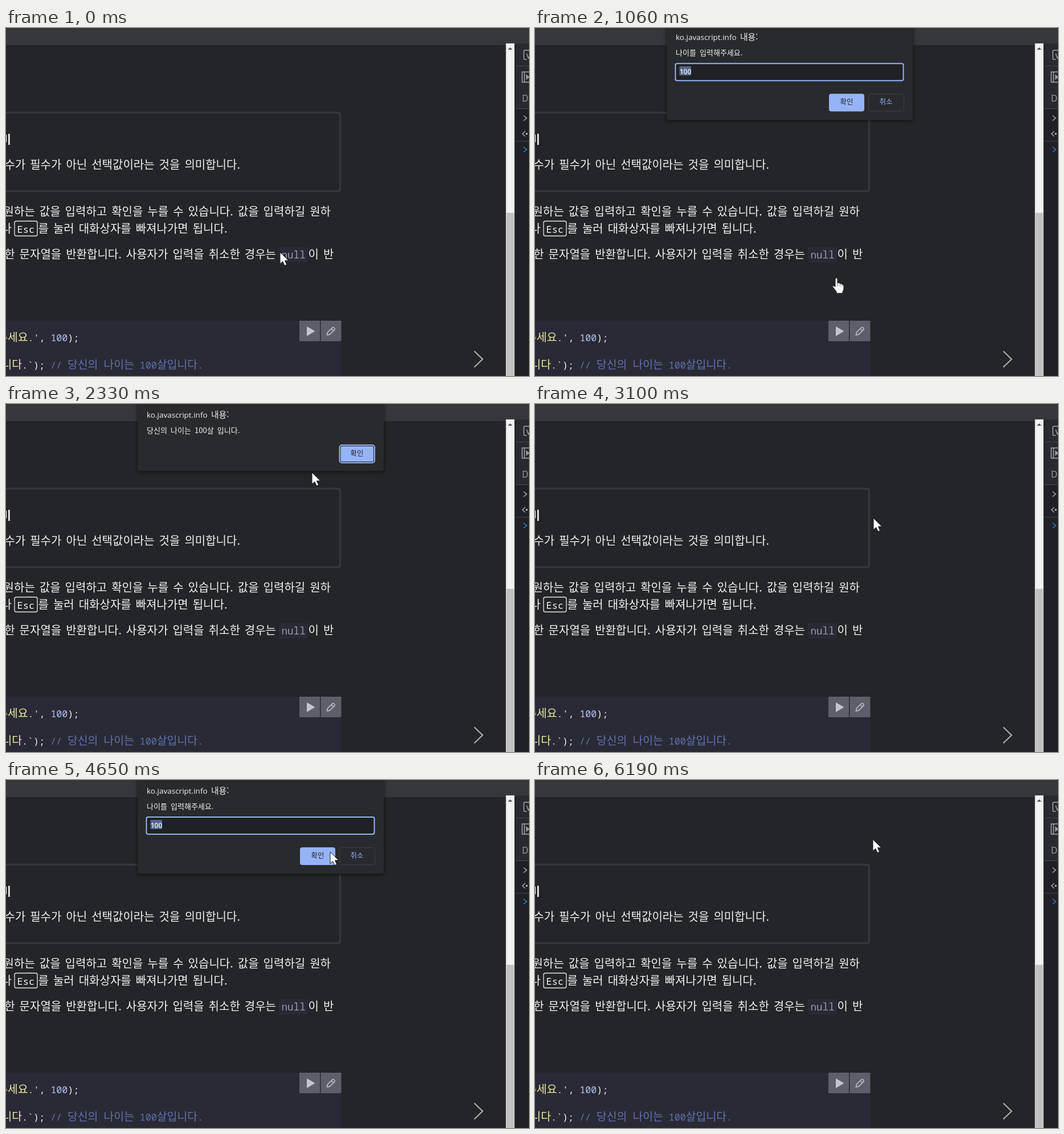
Recreate the animation shown at these times as an HTML page. Size 918 by 610 pixels, loop 6270 ms.

```html
<!DOCTYPE html>
<html lang="ko">
<head>
<meta charset="utf-8">
<style>
  html, body { margin: 0; width: 100%; height: 100%; overflow: hidden; background: #242528; }
  svg { display: block; }
  text { white-space: pre; font: 20px "Noto Sans CJK KR", "Noto Sans CJK", sans-serif; fill: #f2f2f2; }
  .body { word-spacing: 2.4px; }
  .end { text-anchor: end; }
  .mono { font: 16.6px "Noto Sans Mono", "DejaVu Sans Mono", monospace; }
  .medium { font-weight: 500; }
  .ko { font: 19.4px "Noto Sans CJK KR", "Noto Sans CJK", sans-serif; }
  .str { fill: #f0e9a0; }
  .num { fill: #b9c3fa; }
  .note { fill: #6171ae; }
  .ui { font: 13.5px "Open Sans", sans-serif; }
  .msg { font-size: 13px; word-spacing: 2.5px; }
  .btn { font-size: 12.4px; text-anchor: middle; }
  .line { fill: none; stroke: #a4a7ab; stroke-width: 1.5; }
  .panel { fill: #292a2d; filter: drop-shadow(0 1px 3px #0009); }
</style>
</head>
<body>
<svg width="918" height="610" viewBox="0 0 918 610">
  <defs>
    <g id="heading">
      <text class="ui" x="247" y="24">ko.javascript.info</text>
      <text x="360" y="24" style="font-size:14.8px">내용:</text>
    </g>
  </defs>

  <!-- page -->
  <rect width="918" height="30" fill="#36373a"/>
  <rect x="-10" y="148.5" width="596.5" height="137.5" rx="4" fill="none" stroke="#36373b" stroke-width="3.5"/>
  <text class="end" x="9" y="203" style="font-weight:700">의미</text>
  <text class="body end" x="411" y="247">수가 필수가 아닌 선택값이라는 것을 의미합니다.</text>
  <text class="body end" x="570" y="329">원하는 값을 입력하고 확인을 누를 수 있습니다. 값을 입력하길 원하</text>
  <text class="end" x="10" y="359">나</text>
  <rect x="15" y="338.5" width="40" height="26" rx="3" fill="none" stroke="#e8e8e8" stroke-width="1.3"/>
  <text class="mono medium" x="19.5" y="358.5" style="font-size:17px">Esc</text>
  <text class="body" x="56.5" y="359">를 눌러 대화상자를 빠져나가면 됩니다.</text>
  <text class="body end" x="474" y="404">한 문자열을 반환합니다. 사용자가 입력을 취소한 경우는</text>
  <rect x="479" y="384" width="51" height="27" rx="3" fill="#2a2a36"/>
  <text class="mono" x="483.5" y="403.5" style="font-size:17.6px;fill:#9797a6">null</text>
  <text class="body" x="530.5" y="404">이 반</text>

  <!-- code block -->
  <rect y="513" width="588" height="97" fill="#2a2a36"/>
  <text class="mono medium" x="-15" y="548.5"><tspan class="ko str">주세요</tspan><tspan class="str">.'</tspan>, <tspan class="num">100</tspan>);</text>
  <text class="mono medium" x="-25.5" y="597"><tspan class="ko str">입니다</tspan><tspan class="str">.`</tspan>);</text>
  <text class="mono note" x="78" y="597">// <tspan class="ko">당신의</tspan> <tspan class="ko">나이는</tspan> 100<tspan class="ko">살입니다</tspan>.</text>
  <path d="M515 513h36v36h-36zM552.500 513h36v36h-36z" fill="#5d5f69"/>
  <path id="play" d="M528 523L542.500 531.500L528 540Z"/>
  <path d="M563.500 538l1-4.500 8.500-8.500q1.500-1 2.700.3l1 1q1 1.200 0 2.500l-8.700 8.500zM571 527l3.700 3.700" fill="none" stroke="#c5c6cb" stroke-width="1.500"/>
  <path d="M822 566.500L836.500 580.500L822 594.500" fill="none" stroke="#acadae" stroke-width="2.200"/>

  <!-- scrollbar and side panel -->
  <rect x="893" y="27" width="25" height="583" fill="#202124"/>
  <rect x="895" y="27" width="23" height="114" fill="#292a2d"/>
  <rect x="877.500" y="27" width="15" height="583" fill="#f1f1f1"/>
  <rect x="878.500" y="324" width="13" height="286" fill="#c1c1c1"/>
  <path d="M881 38l4-4 4 4z" fill="#505050"/>
  <path d="M895 66.500h23M895 141.500h23M895 198.500h23" stroke="#45474b"/>
  <path class="line" d="M918 39h-7q-2 0-2 2v12q0 2 2 2h3M914 45l3 8 3-5M920 77h-14v18h14M910 77v18"/>
  <path d="M913 81l6 5-6 5z" fill="#9a9da1"/>
  <text class="ui" x="905.500" y="129" style="font-size:16px;fill:#9a9da1">D</text>
  <path class="line" d="M908.500 153.500l5.500 4.500-5.500 4.500M911.500 181l-5 4.500 5 4.500"/>
  <circle cx="914" cy="185.500" r="1.700" fill="#b5b7ba"/>
  <path class="line" d="M908.500 208.500l5.500 4.500-5.500 4.500" style="stroke:#3b78d8"/>

  <!-- dialogs -->
  <g id="prompt">
    <rect class="panel" x="231" y="-30" width="432" height="194" rx="4"/>
    <use href="#heading"/>
    <text class="msg" x="247" y="51">나이를 입력해주세요.</text>
    <rect x="246.500" y="65" width="400" height="30" rx="3" fill="#202124" stroke="#96b3f8" stroke-width="2"/>
    <rect x="253.500" y="70" width="20.500" height="16" fill="#56668c"/>
    <text class="ui" x="253.700" y="83.500" style="font-size:12px;font-weight:600">100</text>
    <rect x="516" y="118" width="62" height="31" rx="4" fill="#96b3f8"/>
    <text class="btn" x="547" y="137" style="fill:#202124">확인</text>
    <rect x="585.500" y="118.500" width="62" height="30" rx="4" fill="none" stroke="#3c4043"/>
    <text class="btn" x="616" y="137" style="fill:#96b3f8">취소</text>
  </g>
  <g id="alert">
    <rect class="panel" x="231" y="-30" width="432" height="147.500" rx="4"/>
    <use href="#heading"/>
    <text class="msg" id="message" x="247" y="51"></text>
    <rect x="585.500" y="72" width="61.500" height="31" rx="4" fill="#202124" stroke="#96b3f8" stroke-width="2"/>
    <rect x="587.500" y="74" width="57.500" height="27" rx="2.500" fill="#96b3f8"/>
    <text class="btn" x="616" y="91" style="fill:#202124">확인</text>
  </g>

  <g id="cursor" fill="#fff" stroke="#17181a" stroke-linejoin="round">
    <path id="arrow" d="M0 0V20.500L4.700 16.300L8 23.500L11.700 22L8.500 14.800H15Z"/>
    <g id="hand">
      <path d="M-2 2Q-2 0 0 0T2 2V9Q5 8 6.500 10Q9 9.500 10 11.500Q13 11 13 14V19Q13 22 11 24V27H0V24L-6 16.500Q-7 14 -5 13.500L-2 15.500Z"/>
      <path d="M2.500 10v5M6.500 11v4M10 12v3" fill="none" stroke="#777"/>
    </g>
  </g>
</svg>
<script>
const LOOP = 6270, STEP = 77.5, FADE = 110;
const el = id => document.getElementById(id);
const clamp = v => Math.max(0, Math.min(1, v));
const show = (id, on) => el(id).setAttribute('visibility', on ? 'visible' : 'hidden');

// Pointer moves from stop to stop; bend bows the path sideways at its middle
const moves = [
  { start: 130, end: 680, to: [531, 524], bend: [22, 0] },
  { start: 910, end: 1530, to: [520, 137] },
  { start: 1610, end: 2080, to: [527, 88] },
  { start: 2330, end: 2950, to: [615, 90], bend: [0, 80] },
  { start: 3020, end: 3560, to: [531, 530] },
  { start: 3730, end: 4030, to: [400, 84], bend: [-44, -44] },
  { start: 4180, end: 4800, to: [617, 138] },
  { start: 4880, end: 5500, to: [614, 92], bend: [-41, 48] },
  { start: 5580, end: 6190, to: [590, 105] },
];

const dialogs = [
  { id: 'prompt', open: 900, close: 1760, bottom: 164 },
  { id: 'alert', open: 1900, close: 2900, bottom: 117, value: '100' },
  { id: 'prompt', open: 3720, close: 4870, bottom: 164 },
  { id: 'alert', open: 5010, close: 5640, bottom: 117, value: 'null' },
];

// The screen refreshes every STEP ms during a move and rests in between
function stateAt(t) {
  let time = 0, point = [481, 393];
  for (const { start, end, to, bend = [0, 0] } of moves) {
    if (t < start) break;
    const last = Math.round((end - start) / STEP);
    const step = Math.min(last, Math.floor((t - start) / STEP + 0.05));
    const p = (step + 1) / (last + 1);
    time = start + step * STEP;
    point = point.map((v, i) => v + (to[i] - v) * p + 4 * p * (1 - p) * bend[i]);
  }
  return { time, point };
}

function drawDialog(dialog, t) {
  const enter = clamp((t - dialog.open) / 200);
  const leave = clamp((t - dialog.close) / FADE);
  const group = el(dialog.id);
  group.setAttribute('opacity', Math.min(1, enter * 3) * (1 - leave));
  group.setAttribute('transform', `translate(0 ${-16 * (1 - enter) ** 3 - 10 * leave})`);
  if (dialog.value) el('message').textContent = `당신의 나이는 ${dialog.value}살 입니다.`;
}

function draw(t) {
  const { time, point: [x, y] } = stateAt(t);
  const dialog = dialogs.find(d => time >= d.open && time < d.close + FADE);
  for (const id of ['prompt', 'alert']) show(id, dialog && dialog.id === id);
  if (dialog) drawDialog(dialog, time);

  const hover = !dialog && x > 515 && x < 552 && y > 513 && y < 549;
  const hand = dialog ? y > dialog.bottom + 4 : hover;
  el('play').setAttribute('fill', hover ? '#8b8d95' : '#c5c6cb');
  show('arrow', !hand);
  show('hand', hand);
  el('cursor').setAttribute('transform', `translate(${Math.round(x)} ${Math.round(y)})`);
}

const begin = performance.now();
function tick() {
  draw((performance.now() - begin) % LOOP);
  requestAnimationFrame(tick);
}
tick();
</script>
</body>
</html>
```
